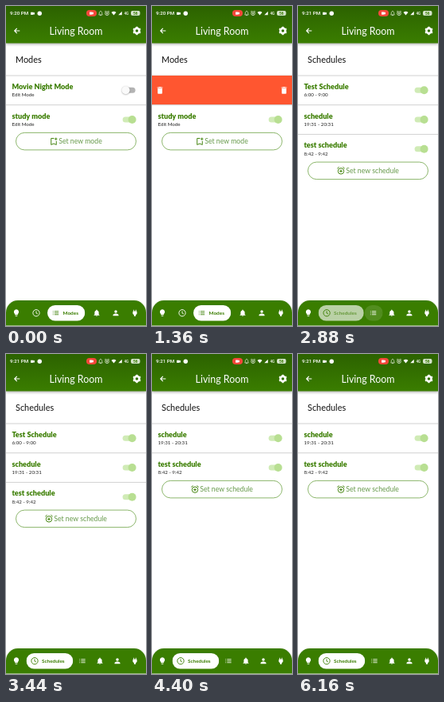
An HTML page with a canvas for the animation above (6240 ms loop, 176 px wide and 400 px high).

```html
<!DOCTYPE html>
<html lang="en">
<head>
<meta charset="utf-8">
<title>Living Room</title>
<style>
html, body { margin: 0; width: 100%; height: 100%; overflow: hidden; background: #fff; }
canvas { display: block; width: 176px; height: 400px; }
</style>
</head>
<body>
<canvas id="stage"></canvas>
<script>
const LOOP = 6240, ROW = 36.7, TOP = 87;
const GREEN = '#3a7d00', DARK = '#2c6200', WHITE = '#fff', RED = '#ff5630';
const SANS = 'Lato, "Open Sans", sans-serif', STATUS = 'Roboto, sans-serif';

const canvas = document.getElementById('stage');
const ctx = canvas.getContext('2d');
const dpr = window.devicePixelRatio || 1;
canvas.width = 176 * dpr;
canvas.height = 400 * dpr;

// Icon paths on a 24-unit grid
const icons = {
  back: 'M20 12H5M12 5l-7 7 7 7',
  trash: 'M6 19c0 1.1.9 2 2 2h8c1.1 0 2-.9 2-2V7H6zM19 4h-3.5l-1-1h-5l-1 1H5v2h14z',
  bulb: 'M9 21c0 .5.4 1 1 1h4c.6 0 1-.5 1-1v-1H9zM12 2C8 2 5 5 5 9c0 2.4 1.2 4.5 3 5.7V17c0 .5.4 1 1 1h6c.6 0 1-.5 1-1v-2.3c1.8-1.3 3-3.4 3-5.7 0-4-3-7-7-7z',
  clock: 'M21 12a9 9 0 1 1-18 0a9 9 0 1 1 18 0M12 7v5.5l4 2.3',
  list: 'M3 7h2M3 12h2M3 17h2M8 7h13M8 12h13M8 17h13',
  bell: 'M12 22c1.1 0 2-.9 2-2h-4c0 1.1.9 2 2 2zM18 16v-5c0-3-1.6-5.6-4.5-6.3V4a1.5 1.5 0 0 0-3 0v.7C7.6 5.4 6 8 6 11v5l-2 2v1h16v-1z',
  person: 'M12 12a4 4 0 1 0 0-8 4 4 0 0 0 0 8zM12 14c-2.7 0-8 1.3-8 4v2h16v-2c0-2.7-5.3-4-8-4z',
  plug: 'M16 7V3h-2v4h-4V3H8v4C7 7 6 8 6 9v5.5L9.5 18v3h5v-3l3.5-3.5V9c0-1-1-2-2-2z',
  bookmark: 'M13 4H5v17l7-3 7 3V11M18 2v7M14.5 5.5h7',
  alarm: 'M20 13a8 8 0 1 1-16 0a8 8 0 1 1 16 0M12 9v8M8 13h8M2 6l5-4M22 6l-5-4',
  camera: 'M3 6h13v4l5-4v12l-5-4v4H3z',
  wedge: 'M21 3v18H3z',
  wifi: 'M12 21L1 8q11-9 22 0z'
};
for (const name in icons) icons[name] = new Path2D(icons[name]);

const clamp = x => Math.min(1, Math.max(0, x));
const progress = (t, start, length) => clamp((t - start) / length);
const smooth = x => x * x * (3 - 2 * x);
const mix = (a, b, p) => a + (b - a) * p;
const tint = p => `rgb(${mix(255, 58, p)},${mix(255, 125, p)},${mix(255, 0, p)})`;

function text(str, x, y, size, weight, color, family = SANS, align = 'left') {
  ctx.font = `${weight} ${size}px ${family}`;
  ctx.textAlign = align;
  ctx.fillStyle = color;
  ctx.fillText(str, x, y);
}

function icon(name, x, y, size, color, line = 0) {
  ctx.save();
  ctx.translate(x - size / 2, y - size / 2);
  ctx.scale(size / 24, size / 24);
  ctx.fillStyle = ctx.strokeStyle = color;
  ctx.lineWidth = line;
  if (line) ctx.stroke(icons[name]); else ctx.fill(icons[name]);
  ctx.restore();
}

function rect(x, y, w, h, color) {
  ctx.fillStyle = color;
  ctx.fillRect(x, y, w, h);
}

function round(x, y, w, h, r, color) {
  ctx.beginPath();
  ctx.roundRect(x, y, w, h, r);
  ctx.fillStyle = color;
  ctx.fill();
}

function shadow(color, blur, dy) {
  ctx.shadowColor = color;
  ctx.shadowBlur = blur * dpr;
  ctx.shadowOffsetY = dy * dpr;
}

function toggle(x, y, on) {
  round(x - 8, y - 3.5, 16, 7, 3.5, on ? '#d0ebb6' : '#b4b4b4');
  ctx.save();
  shadow('rgba(0,0,0,.35)', on ? 0 : 2, on ? 0 : 0.5);
  round(x + (on ? 4 : -4) - 5, y - 5, 10, 10, 5, on ? '#b8df92' : '#fafafa');
  ctx.restore();
}

function drawRow(row, y) {
  text(row.name, 7.4, y + 17, 9.1, 900, GREEN);
  text(row.note, 7.5, y + 26.1, 6.2, 400, '#222');
  toggle(154.6, y + 18.3, row.on);
}

// Background of a swiped row, shrinking around its middle
function drawSwiped(row, swipe, height) {
  ctx.save();
  ctx.beginPath();
  ctx.rect(0, TOP, 176, height);
  ctx.clip();
  rect(0, TOP, 176, height, RED);
  for (const x of [10, 166]) icon('trash', x, TOP + height / 2, 11.5, WHITE);
  ctx.translate(-176 * swipe, 0);
  rect(0, TOP, 176, height, WHITE);
  if (swipe < 1) drawRow(row, TOP);
  ctx.restore();
}

function drawPage(page, t) {
  const swipe = smooth(progress(t, page.swipeAt, 395));
  const shrink = smooth(progress(t, page.swipeAt + 515, 180));
  let y = TOP;
  text(page.title, 12, 71, 10.9, 400, '#111');
  rect(0, 86.5, 176, 1, '#d2d2d2');
  page.rows.forEach((row, i) => {
    const height = i ? ROW : ROW * (1 - shrink);
    if (i && y > TOP) rect(0, y - 0.5, 176, 1, '#d2d2d2');
    if (i || !swipe) drawRow(row, y);
    else if (height > 0) drawSwiped(row, swipe, height);
    y += height;
  });
  ctx.beginPath();
  ctx.roundRect(12.5, y - 2, 151, 21.5, 10.75);
  ctx.strokeStyle = '#7fae5c';
  ctx.lineWidth = 0.9;
  ctx.stroke();
  icon(page.icon, page.iconX, y + 8.8, 11.2, GREEN, 2);
  text(page.button, page.iconX + 6.2, y + 12, 8.7, 400, '#66994a');
}

function drawHeader(t) {
  const shade = ctx.createLinearGradient(0, 0, 0, 46);
  shade.addColorStop(0, DARK);
  shade.addColorStop(1, GREEN);
  ctx.save();
  shadow('rgba(0,0,0,.3)', 3, 1);
  rect(0, 0, 176, 46.5, shade);
  ctx.restore();

  text(t < 2000 ? '9:20 PM' : '9:21 PM', 5, 11.3, 6.2, 500, WHITE, STATUS);
  icon('camera', 33.5, 9.3, 6.5, WHITE);
  round(39.5, 6.5, 5.5, 5.5, 2.75, WHITE);
  round(101, 5, 13, 8, 4, '#f4473a');
  icon('camera', 107.5, 9, 6.5, WHITE);
  icon('bell', 119, 9, 7, WHITE, 2);
  icon('alarm', 127, 9, 7, WHITE, 2.4);
  icon('wifi', 135.5, 9, 6.5, WHITE);
  icon('wedge', 143.5, 9, 6, WHITE);
  text('4G', 148.5, 10.8, 4.5, 500, WHITE, STATUS);
  round(157, 6, 11.5, 6, 2, '#d6e4cd');
  text('56', 162.7, 10.8, 4.8, 700, GREEN, STATUS, 'center');

  icon('back', 13.8, 31, 10.5, WHITE, 2.6);
  text('Living Room', 88, 35.8, 12.4, 400, WHITE, SANS, 'center');
  ctx.strokeStyle = WHITE;
  ctx.lineWidth = 2.6;
  ctx.beginPath();
  ctx.arc(164.5, 31, 3.1, 0, 7);
  ctx.stroke();
  ctx.lineWidth = 2.2;
  for (let i = 0; i < 6; i++) {
    const a = (i + 0.5) * Math.PI / 3, c = Math.cos(a), s = Math.sin(a);
    ctx.beginPath();
    ctx.moveTo(164.5 + 3 * c, 31 + 3 * s);
    ctx.lineTo(164.5 + 5.2 * c, 31 + 5.2 * s);
    ctx.stroke();
  }
}

function drawTab(name, size, label, iconX, left, right, active) {
  ctx.save();
  ctx.beginPath();
  ctx.roundRect(left, 374, right - left, 19.5, 9.75);
  ctx.clip();
  rect(left, 374, right - left, 20, `rgba(255,255,255,${active})`);
  ctx.globalAlpha = active;
  text(label, iconX + 9, 386, 6.4, 700, GREEN);
  ctx.restore();
  icon(name, iconX, 383.7, size, tint(progress(active, 0.2, 0.35)), 2);
}

function drawNav(t) {
  const fade = progress(t, 2620, 400);
  const move = 1 - (1 - fade) ** 3;
  ctx.save();
  shadow('rgba(0,0,0,.1)', 2, -0.5);
  round(0, 368, 176, 31.5, [15, 15, 0, 0], GREEN);
  ctx.restore();
  icon('bulb', 13, 383.7, 10.5, WHITE);
  drawTab('clock', 11, 'Schedules', mix(38, 36, move), mix(27, 25.5, move), mix(49, 84.3, move), fade);
  drawTab('list', 9.8, 'Modes', mix(62.5, 96, move), mix(52, 85, move), mix(99.3, 107, move), (1 - fade) ** 2);
  icon('bell', mix(114, 118, move), 383.7, 10.5, WHITE);
  icon('person', mix(138, 140, move), 383.7, 10.5, WHITE);
  icon('plug', 162, 383.7, 10.5, WHITE);
}

const modes = {
  title: 'Modes', button: 'Set new mode', icon: 'bookmark', iconX: 60, swipeAt: 935,
  rows: [
    { name: 'Movie Night Mode', note: 'Edit Mode', on: false },
    { name: 'study mode', note: 'Edit Mode', on: true }
  ]
};
const schedules = {
  title: 'Schedules', button: 'Set new schedule', icon: 'alarm', iconX: 54, swipeAt: 3600,
  rows: [
    { name: 'Test Schedule', note: '6:00 - 9:00', on: true },
    { name: 'schedule', note: '19:31 - 20:31', on: true },
    { name: 'test schedule', note: '8:42 - 9:42', on: true }
  ]
};

function draw(now) {
  const t = now % LOOP;
  ctx.setTransform(dpr, 0, 0, dpr, 0, 0);
  rect(0, 0, 176, 400, WHITE);
  drawPage(t < 2640 ? modes : schedules, t);
  drawHeader(t);
  drawNav(t);
}

let start;
function tick(now) {
  start ??= now;
  draw(now - start);
  requestAnimationFrame(tick);
}
requestAnimationFrame(tick);
</script>
</body>
</html>
```
